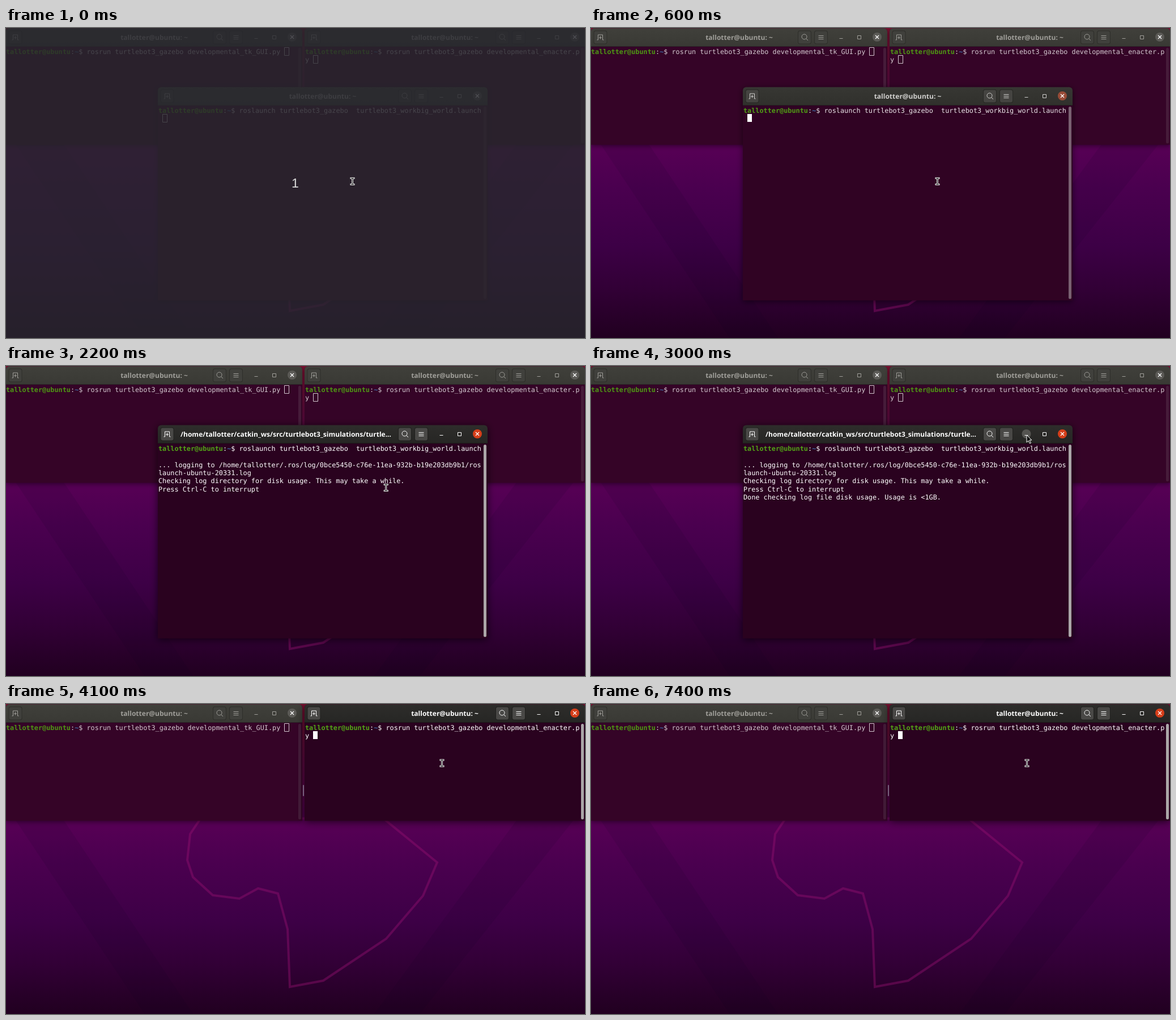
Animation, 1022 px wide and 548 px high, one loop 8 s. Source, as an HTML page with a canvas:

```html
<!DOCTYPE html>
<html lang="en">
<head>
<meta charset="utf-8">
<title>Terminals</title>
<style>
html, body { margin: 0; width: 100%; height: 100%; overflow: hidden; background: #230021; }
canvas { display: block; }
</style>
</head>
<body>
<canvas id="stage" width="1022" height="548"></canvas>
<script>
const W = 1022, H = 548, LOOP = 8000;
const ctx = document.getElementById('stage').getContext('2d');
const CHAR = 7.125, LINE = 14.3;
const MONO = '11.83px "DejaVu Sans Mono", monospace';
const SANS = 'bold 12px "Noto Sans", sans-serif';
const USER = 'tallotter';
const SHORT_TITLE = USER + '@ubuntu: ~';
const LONG_TITLE = `/home/${USER}/catkin_ws/src/turtlebot3_simulations/turtle...`;

// Output lines and the time each one appears
const LOG = [
  [1800, `... logging to /home/${USER}/.ros/log/0bce5450-c76e-11ea-932b-b19e203db9b1/ros`],
  [1800, 'launch-ubuntu-20331.log'],
  [1900, 'Checking log directory for disk usage. This may take a while.'],
  [1900, 'Press Ctrl-C to interrupt'],
  [2400, 'Done checking log file disk usage. Usage is <1GB.']
];

const clamp = v => Math.max(0, Math.min(1, v));
const lerp = (a, b, k) => a + (b - a) * k;
const mix = (a, b, k) => `rgb(${a.map((v, i) => Math.round(lerp(v, b[i], k)))})`;

function rect(x, y, w, h, fill) {
  ctx.fillStyle = fill;
  ctx.fillRect(x, y, w, h);
}

function round(x, y, w, h, r, fill) {
  ctx.beginPath();
  ctx.roundRect(x, y, w, h, r);
  ctx.fillStyle = fill;
  ctx.fill();
}

function disc(x, y, r, fill) {
  ctx.beginPath();
  ctx.arc(x, y, r, 0, 7);
  ctx.fillStyle = fill;
  ctx.fill();
}

function polygon(points) {
  ctx.beginPath();
  points.forEach(p => ctx.lineTo(...p));
  ctx.closePath();
}

function stroke(path, color, width = 1) {
  ctx.strokeStyle = color;
  ctx.lineWidth = width;
  ctx.stroke(new Path2D(path));
}

function text(str, x, y, font, color, align = 'left') {
  ctx.font = font;
  ctx.fillStyle = color;
  ctx.textAlign = align;
  ctx.fillText(str, x, y);
}

function wallpaper() {
  const g = ctx.createLinearGradient(0, 0, 0, H);
  [[0, '#7d1232'], [.18, '#680a48'], [.38, '#570055'], [.52, '#4a004f'],
   [.7, '#3d0046'], [.84, '#320036'], [1, '#210020']].forEach(s => g.addColorStop(...s));
  rect(0, 0, W, H, g);
  ctx.fillStyle = 'rgba(15,0,35,.1)';
  polygon([[0, 180], [85, 180], [330, H], [245, H]]);
  ctx.fill();
  polygon([[W, 180], [920, 180], [650, H], [730, H]]);
  ctx.fill();
  polygon([[345, 200], [325, 230], [320, 276], [330, 306], [365, 338], [412, 344], [445, 326],
           [480, 335], [497, 398], [501, 500], [560, 489], [671, 415], [736, 339], [761, 280], [668, 204]]);
  ctx.strokeStyle = 'rgba(150,18,112,.42)';
  ctx.lineWidth = 4;
  ctx.stroke();
}

function button(x, y, focus) {
  round(x - 12, y - 12, 24, 24, 4, mix([46, 46, 42], [32, 32, 30], focus));
  round(x - 11, y - 11, 22, 22, 3, mix([64, 64, 60], [73, 72, 70], focus));
}

function titleBar(w, ink) {
  const { x, y, right, focus } = w, cy = y + 16.5;
  const g = ctx.createLinearGradient(0, y, 0, y + 33);
  g.addColorStop(0, mix([64, 64, 59], [46, 45, 43], focus));
  g.addColorStop(1, mix([57, 57, 52], [38, 38, 36], focus));
  round(x, y + .5, right - x, 32.5, [6, 6, 0, 0], g);
  rect(x, y + 32, right - x, 1, mix([42, 42, 38], [27, 27, 25], focus));
  text(w.title, w.title === LONG_TITLE ? 494 : (x + right) / 2, y + 21, SANS, ink, 'center');

  const tab = x + 16.5, search = right - 146, menu = right - 117;
  [tab, search, menu].forEach(bx => button(bx, cy, focus));
  stroke(`M${tab - 6} ${cy + 4.5}h2v-9h8v9h2M${tab - 2.5} ${cy + .5}h5m-2.5-2.5v5`, ink);
  stroke(`M${search - 5} ${cy - 1}a4.5 4.5 0 1 1 9 0a4.5 4.5 0 1 1-9 0M${search + 2.5} ${cy + 2}l3.5 3.5`, ink);
  stroke(`M${menu - 4.5} ${cy - 3}h9m-9 3h9m-9 3h9`, ink);

  const min = right - 81.5, max = right - 49.5, close = right - 18;
  if (w.hover) disc(min, cy - .5, 8, '#555451');
  stroke(`M${min - 3} ${cy + 2}h6`, ink);
  stroke(`M${max - 3} ${cy - 3}h6v6h-6z`, ink);
  disc(close, cy - .5, 8, mix([91, 90, 86], [214, 62, 26], focus));
  stroke(`M${close - 3} ${cy - 3.5}l6 6m0-6l-6 6`, '#fff', 1.3);
}

function terminal(w) {
  const { x, y, right, bottom, focus } = w;
  ctx.save();
  ctx.shadowColor = `rgba(0,0,0,${lerp(.45, .65, focus)})`;
  ctx.shadowBlur = lerp(8, 14, focus);
  ctx.shadowOffsetY = 2;
  round(x, y + .5, right - x, bottom - y, [6, 6, 0, 0], mix([53, 4, 39], [42, 2, 31], focus));
  ctx.restore();
  titleBar(w, mix([160, 159, 154], [255, 255, 255], focus));
  round(right - 7, y + 35, 5, bottom - y - 37, 2.5, mix([70, 28, 58], [171, 166, 168], focus));

  const ink = mix([211, 200, 207], [255, 255, 255], focus);
  const left = x + (x ? 1 : 0);
  const put = (str, col, row, color = ink, weight = '') =>
    text(str, left + col * CHAR, y + 46 + row * LINE, weight + MONO, color);
  put(USER + '@ubuntu', 0, 0, mix([78, 150, 20], [82, 164, 22], focus), 'bold ');
  put(':', 16, 0);
  put('~', 17, 0, '#3d66a0', 'bold ');
  put('$', 18, 0);
  w.lines.forEach((str, row) => put(str, row ? 0 : 20, row));

  const cx = Math.round(left + w.cursor[0] * CHAR - .5), cy = Math.round(y + 34 + w.cursor[1] * LINE);
  if (!focus) stroke(`M${cx + .5} ${cy + .5}h8v14h-8z`, ink);
  else if (w.blink) rect(cx, cy, 8, 14, '#fff');
}

function mouse(x, y, arrow) {
  if (arrow) {
    const shape = new Path2D(`M${x} ${y}v13l3-3l2.5 5l2-1l-2.5-5h4z`);
    ctx.fillStyle = '#111';
    ctx.fill(shape);
    ctx.strokeStyle = '#fff';
    ctx.lineWidth = 1;
    ctx.stroke(shape);
  } else {
    const beam = `M${x - 2.5} ${y - 5.5}h5m-2.5 0v11m-2.5 0h5`;
    ctx.lineCap = 'square';
    stroke(beam, '#eee', 3);
    stroke(beam, '#111', 1);
    ctx.lineCap = 'butt';
  }
}

function pointer(t) {
  if (t >= 3800) return [769.5, 104.5];
  if (t >= 3600) return [769.5, 108.5];
  if (t >= 3300) return [770, 132];
  const k = clamp((t - 1700) / 1200), ease = k * k * (3 - 2 * k);
  return [lerp(611.5, 769, ease), lerp(271, 122, ease)];
}

// On at the first time given, then toggled at each following one
const blinkAt = (t, times) => times.filter(s => t >= s).length % 2 === 1;

function draw(time) {
  const t = Math.floor(time / 100) * 100;
  const [mx, my] = pointer(t);
  const open = t < 3300, entered = t >= 1500;
  wallpaper();

  terminal({
    x: 0, y: 0, right: 523, bottom: 206, focus: 0, title: SHORT_TITLE,
    lines: ['rosrun turtlebot3_gazebo developmental_tk_GUI.py'], cursor: [69, 0]
  });
  terminal({
    x: 527, y: 0, right: 1022, bottom: 206, focus: clamp((t - 3700) / 400), title: SHORT_TITLE,
    lines: ['rosrun turtlebot3_gazebo developmental_enacter.p', 'y'], cursor: [2, 1],
    blink: blinkAt(t, [3800, 4300, 5000, 5600, 6100, 6700, 7400])
  });
  round(524, 143, 2, 20, 1, '#75627a');

  if (open) {
    const log = LOG.filter(([start]) => t >= start).map(([, line]) => line);
    terminal({
      x: 268, y: 104, right: 850, bottom: 481, focus: clamp((t - 500) / 200),
      title: t >= 2000 ? LONG_TITLE : SHORT_TITLE,
      lines: ['roslaunch turtlebot3_gazebo  turtlebot3_workbig_world.launch', '', ...log],
      cursor: entered ? [0, 2 + log.length] : [1, 1],
      blink: blinkAt(t, [600, 1000, 1200, 2100, 2700]) && t < 2700,
      hover: t >= 2700
    });
  }

  if (t < 100) {
    rect(0, 0, W, H, 'rgba(40,40,46,.82)');
    text('1', 510.5, 282, '23px "Liberation Sans", sans-serif', '#ddd', 'center');
  }
  mouse(mx, my, open && my < 136);
}

ctx.textRendering = 'geometricPrecision';
const begin = performance.now();
function tick() {
  draw((performance.now() - begin) % LOOP);
  requestAnimationFrame(tick);
}
tick();
</script>
</body>
</html>
```
